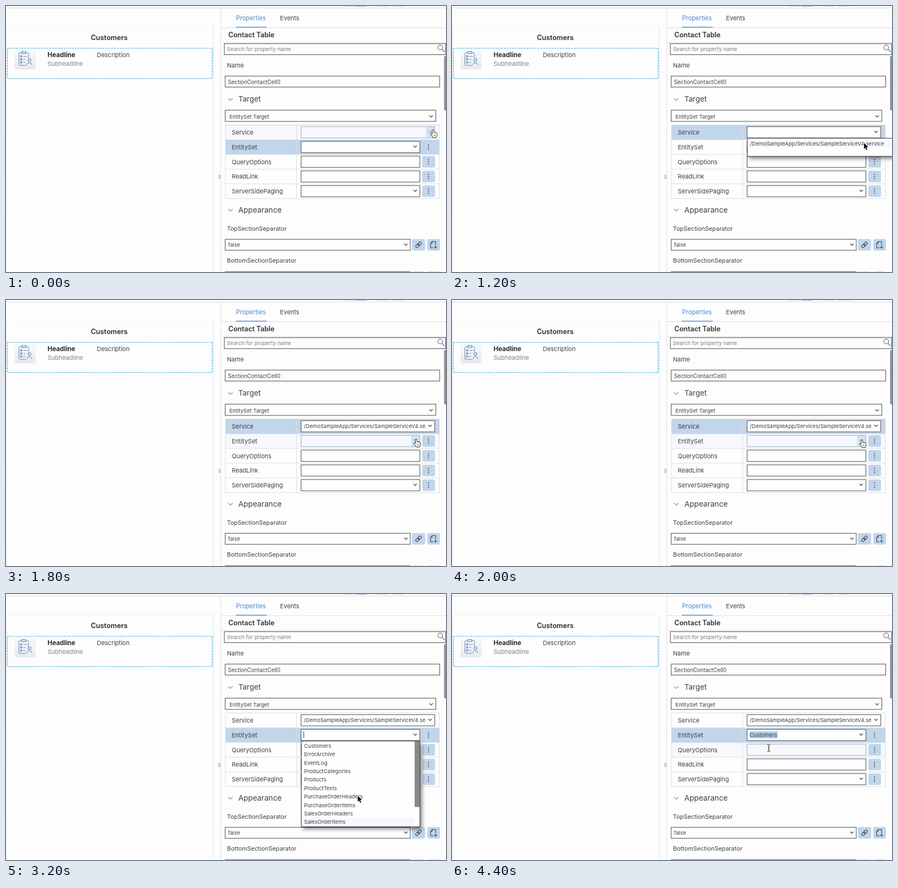
These frames come from a looping animation (800 px wide and 484 px high, 4.6 s). An HTML page with a canvas:

```html
<!DOCTYPE html>
<html lang="en">
<head>
<meta charset="utf-8">
<style>
html, body { margin: 0; width: 100%; height: 100%; overflow: hidden; background: #fdfdfd; }
canvas { display: block; }
</style>
</head>
<body>
<canvas id="stage" width="800" height="484"></canvas>
<script>
const ctx = document.getElementById('stage').getContext('2d');
const LOOP = 4600, STEP = 200;
const INK = '#3c4044', EDGE = '#5e6164', BLUE = '#c1d5eb', HOVER = '#f7f8fd';
const ROWS = ['Service', 'EntitySet', 'QueryOptions', 'ReadLink', 'ServerSidePaging'];
const SERVICE = '/DemoSampleApp/Services/SampleServiceV4.service';
const SETS = ['Customers', 'ErrorArchive', 'EventLog', 'ProductCategories', 'Products',
  'ProductTexts', 'PurchaseOrderHeaders', 'PurchaseOrderItems', 'SalesOrderHeaders',
  'SalesOrderItems', 'Stock', 'Suppliers'];
const ROW_TOP = 216.5, ROW_H = 26.8, ITEM_H = 15.4;

// Pointer keys: time, hot spot x and y, shape
const POINTER = [
  [0, 776, 226, 'hand'], [200, 772, 229, 'hand'], [600, 771.5, 229, 'hand'],
  [800, 765, 243, 'arrow'], [1200, 749, 249, 'arrow'],
  [1400, 747, 253, 'hand'], [1800, 745.5, 254, 'hand'], [2000, 745, 255, 'hand'],
  [2200, 738, 262, 'hand'], [2600, 670, 333, 'arrow'], [3000, 639.5, 367, 'arrow'],
  [3200, 639.5, 367, 'arrow'], [3800, 582, 276, 'arrow'], [4000, 579, 273, 'arrow'],
  [4200, 579, 272, 'beam'], [4400, 576, 280.5, 'beam']
];

function pointerAt(t) {
  let i = POINTER.length - 1;
  while (POINTER[i][0] > t) i--;
  const a = POINTER[i], b = POINTER[i + 1] || a;
  const k = b === a ? 0 : (t - a[0]) / (b[0] - a[0]);
  return { x: a[1] + (b[1] - a[1]) * k, y: a[2] + (b[2] - a[2]) * k, shape: a[3] };
}

function fill(x, y, w, h, color) {
  ctx.fillStyle = color;
  ctx.fillRect(x, y, w, h);
}

function frame(x, y, w, h, color = EDGE, back) {
  if (back) fill(x, y, w, h, back);
  ctx.strokeStyle = color;
  ctx.lineWidth = 1.15;
  ctx.strokeRect(x, y, w, h);
}

function rounded(x, y, w, h, r, color) {
  ctx.beginPath();
  ctx.roundRect(x, y, w, h, r);
  ctx.fillStyle = color;
  ctx.fill();
}

function text(s, x, y, size = 11, color = INK, weight = 400) {
  ctx.font = `${weight} ${size}px Inter, "Liberation Sans", sans-serif`;
  ctx.fillStyle = color;
  ctx.fillText(s, x, y);
}

const small = (s, x, y, color = INK) => text(s, x, y, 9.6, color);

function line(points, color, width = 1) {
  ctx.beginPath();
  points.forEach(([x, y]) => ctx.lineTo(x, y));
  ctx.strokeStyle = color;
  ctx.lineWidth = width;
  ctx.stroke();
}

function ring(x, y, r, color, width = 1) {
  ctx.beginPath();
  ctx.arc(x, y, r, 0, 7);
  ctx.strokeStyle = color;
  ctx.lineWidth = width;
  ctx.stroke();
}

function chevron(x, y, w = 3, color = '#505458', width = 1.4) {
  line([[x - w, y - w / 2], [x, y + w / 2], [x + w, y - w / 2]], color, width);
}

function dashed(points, color, width, dash) {
  ctx.setLineDash(dash);
  line(points, color, width);
  ctx.setLineDash([]);
}

function contactIcon() {
  const c = '#6488b8';
  const g = ctx.createLinearGradient(0, 79, 0, 116);
  g.addColorStop(0, '#f8f9fa');
  g.addColorStop(1, '#e6e9ee');
  rounded(15.5, 79, 38.5, 36.5, 4, g);
  ctx.beginPath();
  ctx.roundRect(23.5, 85, 17.5, 23, 1.5);
  ctx.strokeStyle = c;
  ctx.lineWidth = 1;
  ctx.stroke();
  frame(28.5, 83, 7.5, 3.5, c, '#f2f4f6');
  for (let i = 0; i < 3; i++) {
    const y = 90.5 + i * 5.5;
    frame(26.5, y, 2.3, 2.3, c);
    line([[31.5, y + 1.3], [i ? 35 : 38.5, y + 1.3]], c);
  }
  fill(36.5, 95, 11, 14.5, '#eceff3');
  ring(42.5, 98.3, 2.6, c, 1.1);
  ctx.beginPath();
  ctx.arc(42.5, 107.5, 4.3, Math.PI, 0);
  ctx.stroke();
}

function leftPane() {
  line([[0, 38.5], [378, 38.5]], '#f4f4f4');
  fill(378, 39, 1, 445, '#f6f6f6');
  dashed([[1, 39], [1, 484]], '#e0dcd6', 1, [3, 2]);
  dashed([[376.7, 39], [376.7, 484]], '#cbe1ef', 1.2, [3, 2]);
  text('Customers', 154.3, 62.3, 12.65, '#2c2c2e', 600);
  dashed([[2.5, 77], [375, 77], [375, 132], [2.5, 132], [2.5, 77]], '#78c6e6', 1.7, [3.5, 1.6]);
  contactIcon();
  text('Headline', 75.5, 93.3, 11.7, '#2c2c2e', 700);
  text('Description', 165.2, 93.3);
  text('Subheadline', 75.5, 109.3, 11, '#808386');
  fill(386.5, 307, 1, 8, '#a5a5a5');
  fill(388.7, 307, 1, 8, '#a5a5a5');
}

function header() {
  line([[0, 3.7], [800, 3.7]], '#dedcdc');
  [[612, 22], [635, 22], [673, 22], [703, 21]].forEach(([x, w], i) => {
    rounded(x, -4, w, 5, 2, i === 1 ? '#a4a8b8' : '#cfd1da');
  });
}

function actionButtons(y) {
  rounded(738, y, 24, 21, 3, BLUE);
  rounded(766, y, 23, 21, 3, BLUE);
}

function linkIcon() {
  ctx.save();
  ctx.translate(750, 434.5);
  ctx.rotate(-Math.PI / 4);
  ctx.strokeStyle = INK;
  ctx.lineWidth = 1.1;
  for (const x of [-6.2, -0.8]) {
    ctx.beginPath();
    ctx.roundRect(x, -2.3, 7, 4.6, 2.3);
    ctx.stroke();
  }
  ctx.restore();
}

function pageIcon() {
  line([[777, 440], [772, 440], [772, 432], [775, 428.5], [781, 428.5], [781, 435]], INK, 1.1);
  line([[772, 432], [775, 432], [775, 428.5]], INK);
  line([[778, 439], [784, 439]], INK, 1.1);
  line([[781, 436], [781, 442]], INK, 1.1);
}

function rightPane() {
  line([[390.5, 4], [390.5, 484]], '#e0e0e0');
  text('Properties', 418.3, 26, 11.1, '#4c88cb');
  text('Events', 498.3, 26);
  line([[391, 39.5], [800, 39.5]], '#dedede');
  fill(418, 37.6, 56, 1.8, '#70a4da');
  text('Contact Table', 404.3, 56.8, 12.5, '#303336', 600);
  line([[391, 66.5], [800, 66.5]], '#dcdcdc');
  frame(397, 68.5, 402.4, 20);
  small('Search for property name', 401.8, 81.8, '#7a7d80');
  ring(789.5, 75.5, 4.3, '#75787c', 1.2);
  line([[792.7, 78.8], [797.5, 83.5]], '#75787c', 1.4);
  rounded(796.5, 91, 5, 99, 2, '#909090');
  text('Name', 401.8, 111.6);
  frame(398.5, 127.5, 390, 20);
  text('SectionContactCell0', 403.5, 141.5, 9.85);
  chevron(408, 170, 4, '#8d9093', 1.1);
  text('Target', 422.5, 174.3, 13.5);
  frame(398.5, 189.5, 383, 20.5);
  small('EntitySet Target', 406.2, 205);
  chevron(773, 200.5);
  chevron(408, 371.5, 4, '#8d9093', 1.1);
  text('Appearance', 422.5, 375.8, 13.7);
  text('TopSectionSeparator', 401.8, 408.5, 10.9);
  frame(398.5, 424.5, 336.5, 20);
  small('false', 403.8, 438);
  chevron(727, 434);
  actionButtons(424);
  linkIcon();
  pageIcon();
  text('BottomSectionSeparator', 401.8, 467.3, 10.9);
  line([[398, 483.5], [735, 483.5]], EDGE);
  actionButtons(483);
}

function table(s) {
  ROWS.forEach((name, i) => {
    const y = ROW_TOP + i * ROW_H, mid = y + 13.3;
    const hovered = s.hover === i, right = i ? 752.5 : 779.5;
    const soft = s.soft === i, pale = hovered || soft;
    const back = s.active === i ? BLUE : soft ? '#ecf0f6' : hovered ? HOVER : null;
    if (back) fill(399, y, 389, ROW_H, back);
    line([[399, y], [788, y]], hovered ? '#c6d7e8' : '#dcdee0');
    text(name, 410.5, mid + 4.1);
    frame(536.5, mid - 10.3, right - 536.5, 20.5, pale ? '#a9b2bd' : EDGE,
      hovered ? HOVER : '#fefefe');
    if (i < 2 || i === 4) {
      if (pale) fill(right - 16, mid - 9.5, 15.5, 19, '#d3e2f1');
      chevron(right - 8.5, mid - 1, 3, pale ? '#9eb5cb' : '#505458');
    }
    if (i) {
      rounded(757, mid - 10.5, 23, 21, 3, BLUE);
      for (const d of [-4, 0, 4]) fill(767.4, mid + d - 0.8, 1.7, 1.7, INK);
    }
  });
  const bottom = ROW_TOP + 5 * ROW_H;
  line([[399, bottom], [788, bottom]], '#dcdee0');
  for (const x of [399, 528.5, 788]) line([[x, ROW_TOP], [x, bottom]], '#dcdee0');

  if (s.filled) {
    ctx.save();
    ctx.beginPath();
    ctx.rect(538, 220, 224, 20);
    ctx.clip();
    small(SERVICE, 541.5, 233);
    ctx.restore();
  }
  if (s.chosen) {
    fill(541, 250, 51, 12.5, '#b0cbe7');
    small('Customers', 541.5, 260);
  }
  if (s.caret !== null) fill(541, ROW_TOP + s.caret * ROW_H + 6.5, 1, 12, '#444');
}

function popup(x, y, w, h) {
  ctx.save();
  ctx.shadowColor = 'rgba(0,0,0,.5)';
  ctx.shadowBlur = 7;
  ctx.shadowOffsetX = 3;
  ctx.shadowOffsetY = 4;
  fill(x, y, w, h, '#fefefe');
  ctx.restore();
  frame(x, y, w, h, '#484848');
}

function serviceList(s) {
  popup(537, 240.7, 265, 32.8);
  if (s.soft === 0) fill(537.6, 257.5, 263, 15.5, BLUE);
  else fill(537.6, 242, 263, 15.5, HOVER);
  small(SERVICE, 541.8, 253.5);
}

function entityList(s) {
  popup(537, 267.5, 215.5, 156);
  ctx.save();
  ctx.beginPath();
  ctx.rect(537.6, 268, 214.4, 155);
  ctx.clip();
  SETS.forEach((name, i) => {
    const y = 268.7 + (i - s.scroll) * ITEM_H;
    if (i === s.item) fill(538, y, 205, ITEM_H, HOVER);
    small(name, 542, y + 11);
  });
  rounded(743, 268 + s.scroll * 11.7, 9.5, 119.5, 1, '#888888');
  ctx.restore();
}

function outline(points, back, edge, width) {
  ctx.beginPath();
  points.forEach(([x, y]) => ctx.lineTo(x, y));
  ctx.closePath();
  ctx.lineJoin = 'round';
  ctx.strokeStyle = edge;
  ctx.lineWidth = width;
  ctx.stroke();
  ctx.fillStyle = back;
  ctx.fill();
  ctx.lineJoin = 'miter';
}

function pointer({ x, y, shape }) {
  ctx.save();
  ctx.translate(x, y);
  if (shape === 'arrow') {
    outline([[0, 0], [0, 11], [2.5, 8.7], [4.4, 13], [6.3, 12.1], [4.5, 8], [7.8, 7.8]],
      '#111', '#fff', 1.8);
  } else if (shape === 'hand') {
    outline([[-0.8, 0], [0.8, 0], [1.8, 4.8], [4, 4.5], [6, 5.2], [7.5, 6.4],
      [7.2, 10], [6, 13], [1, 13], [-1.2, 10], [-3.6, 7], [-2.4, 6.2], [-0.3, 7.8]],
      '#fdfdfd', '#333', 1.9);
    for (const d of [2.2, 4.2]) line([[d, 8], [d + 0.2, 11]], '#555', 0.8);
  } else {
    line([[0, -5], [0, 5]], '#222', 1.3);
    line([[-2.7, -6.5], [-1, -6.2], [0, -5], [1, -6.2], [2.7, -6.5]], '#222');
    line([[-2.7, 6.5], [-1, 6.2], [0, 5], [1, 6.2], [2.7, 6.5]], '#222');
  }
  ctx.restore();
}

function stateAt(t, p) {
  const within = (a, b) => t >= a && t < b;
  const scroll = within(2600, 3200) ? 3 : 0;
  const pointed = Math.floor((p.y - 268.7) / ITEM_H) + scroll;
  return {
    active: t < 600 || t >= 2200 ? 1 : within(800, 2200) ? 0 : null,
    soft: within(600, 800) ? 0 : null,
    hover: t < 600 ? 0 : within(1400, 2200) ? 1 : t >= 4200 ? 2 : null,
    caret: within(600, 1000) ? 0 : within(2200, 2600) || within(3000, 3400) ? 1 : null,
    filled: t >= 1400,
    chosen: t >= 4200,
    serviceOpen: within(600, 1400),
    entityOpen: within(2200, 4200),
    scroll,
    item: within(3200, 3400) ? 9 : pointed
  };
}

function draw(now) {
  const t = Math.floor((now % LOOP) / STEP) * STEP;
  const p = pointerAt(t), s = stateAt(t, p);
  fill(0, 0, 800, 484, '#fdfdfd');
  leftPane();
  header();
  rightPane();
  table(s);
  if (s.serviceOpen) serviceList(s);
  if (s.entityOpen) entityList(s);
  pointer(p);
}

const start = performance.now();
function tick() {
  draw(performance.now() - start);
  requestAnimationFrame(tick);
}
tick();
</script>
</body>
</html>
```
